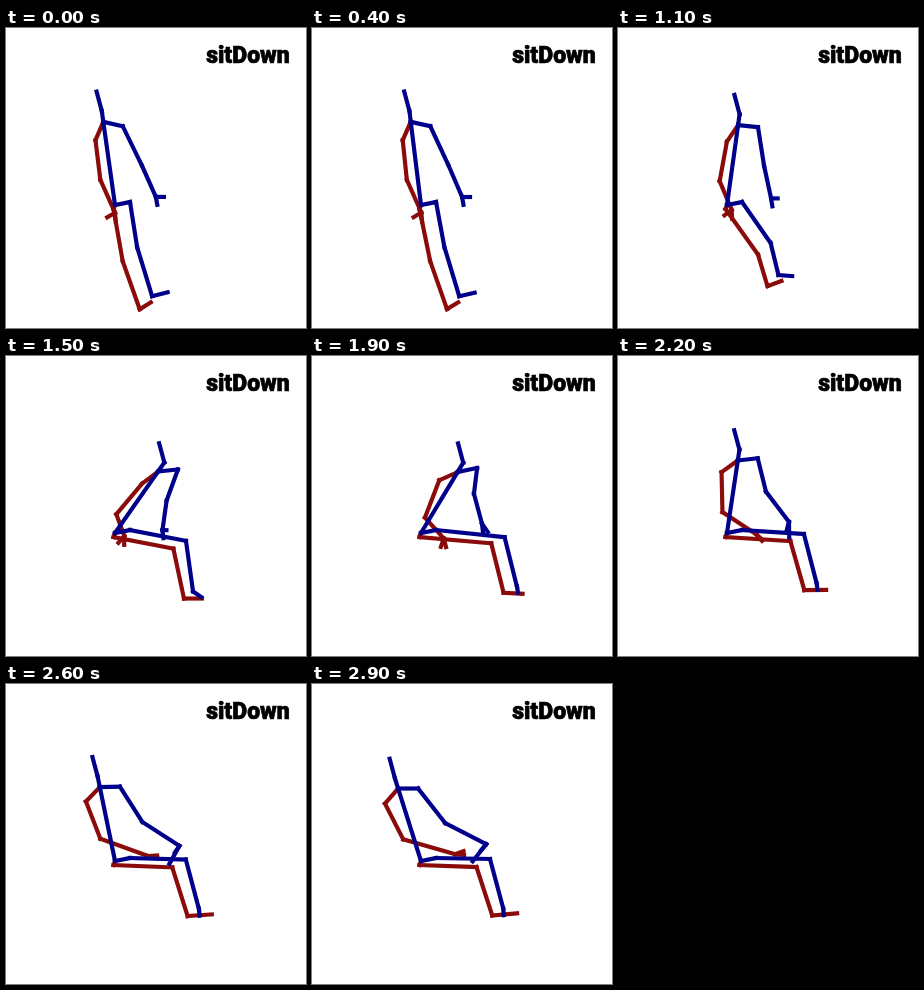
An HTML page with a canvas that plays this animation: 300 px wide and 300 px high, repeating every 3000 ms.

```html
<!DOCTYPE html>
<html lang="en">
<head>
<meta charset="utf-8">
<title>sitDown</title>
<style>
  html, body { margin: 0; width: 100%; height: 100%; overflow: hidden; background: #fff; }
  canvas { display: block; width: 300px; height: 300px; }
</style>
</head>
<body>
<canvas id="stage" width="300" height="300"></canvas>
<script>
const ctx = document.getElementById('stage').getContext('2d');
const LOOP = 3000, STEP = 100;
const PELVIS = [109, 177];

// Each bone swings through four poses: stand, lean forward, sit, recline.
// Angles are in degrees clockwise from the right; a single value stays constant.
const spine = { angle: [-98, -55, -59, -107.5], length: [84, 75, 71, 76] };
const head = { angle: -105, length: 20 };
const NECK = 11;

const blue = {
  color: '#00008b',
  hip: [124, 174],
  shoulder: { angle: [13, -6, -12, 0], length: 20 },
  upperArm: { angle: [64, 110, 97, 52], length: [43, 33, 26, 44] },
  forearm: { angle: [66, 98, 75, 27], length: [35, 30, 31, 46] },
  fingers: { angle: [0, 0, 55, 128], length: [8, 4, 10, 22] },
  thumb: { angle: [80, 83, 83, 130], length: 8 },
  thigh: { angle: [81, 11, 6, 1], length: [46, 57, 69, 54] },
  shin: { angle: [73, 82, 76, 75], length: 51 },
  foot: { angle: [-14, 35, 80, 85], length: [16, 10, 6, 7] }
};

const red = {
  color: '#8b0a0a',
  hip: [107.5, 181],
  shoulder: { angle: [113, 143, 156, 131], length: 20 },
  upperArm: { angle: [83, 130, 111, 63], length: 40 },
  forearm: { angle: [66, 70, 48, 16], length: [36, 23, 28, 54] },
  fingers: { angle: [150, 130, 108, -20], length: 9 },
  thumb: { angle: [85, 90, 75, 5], length: 9 },
  thigh: { angle: [80, 11, 5, 2], length: [53, 61, 72, 57] },
  shin: { angle: [70.5, 78, 76, 72], length: 51 },
  foot: { angle: [-32, 0, 3, -5], length: [13, 18, 19, 25] }
};

const easeOut = (u, power) => 1 - (1 - u) ** power;

// Position between the poses: 0 stand, 1 lean, 2 sit, 3 recline.
function phaseAt(t) {
  if (t < 700) return 0.04 * t / 700;
  if (t < 1100) return 0.04 + 0.33 * ((t - 700) / 400) ** 1.4;
  if (t < 1500) return 0.37 + 0.63 * easeOut((t - 1100) / 400, 1.6);
  if (t < 1900) return 1 + (t - 1500) / 400;
  return 2 + easeOut(Math.min(1, (t - 1900) / 1000), 1.75);
}

function sample(value, phase) {
  if (!Array.isArray(value)) return value;
  const i = Math.min(2, Math.floor(phase));
  return value[i] + (value[i + 1] - value[i]) * (phase - i);
}

function polar([x, y], degrees, length) {
  const a = degrees * Math.PI / 180;
  return [x + length * Math.cos(a), y + length * Math.sin(a)];
}

function reach(from, bone, phase, scale = 1) {
  return polar(from, sample(bone.angle, phase), scale * sample(bone.length, phase));
}

function drawBones(color, ...points) {
  ctx.strokeStyle = color;
  for (let i = 1; i < points.length; i++) {
    ctx.beginPath();
    ctx.moveTo(...points[i - 1]);
    ctx.lineTo(...points[i]);
    ctx.stroke();
  }
}

function drawSide(side, collar, phase) {
  // The shins point towards the viewer halfway down.
  const shorten = phase < 1 ? 1 - 0.42 * Math.sin(Math.PI * phase) ** 2 : 1;
  const knee = reach(side.hip, side.thigh, phase);
  const ankle = reach(knee, side.shin, phase, shorten);
  drawBones(side.color, PELVIS, side.hip, knee, ankle, reach(ankle, side.foot, phase));

  const shoulder = reach(collar, side.shoulder, phase);
  const elbow = reach(shoulder, side.upperArm, phase);
  const wrist = reach(elbow, side.forearm, phase);
  drawBones(side.color, collar, shoulder, elbow, wrist, reach(wrist, side.fingers, phase));
  drawBones(side.color, wrist, reach(wrist, side.thumb, phase));
}

function drawTitle() {
  ctx.fillStyle = ctx.strokeStyle = '#000';
  ctx.font = '900 23px Roboto, sans-serif';
  ctx.textAlign = 'center';
  ctx.lineWidth = 0.7;
  ctx.fillText('sitDown', 242, 35.3);
  ctx.strokeText('sitDown', 242, 35.3);
}

function draw(t) {
  ctx.fillStyle = '#fff';
  ctx.fillRect(0, 0, 300, 300);
  drawTitle();

  const phase = phaseAt(t);
  const collar = reach(PELVIS, spine, phase);
  const neck = polar(collar, sample(spine.angle, phase), NECK);
  ctx.lineWidth = 4.17;
  ctx.lineCap = 'square';
  drawSide(red, collar, phase);
  drawBones(blue.color, PELVIS, collar, neck, reach(neck, head, phase));
  drawSide(blue, collar, phase);
}

const start = performance.now();
function tick() {
  const t = (performance.now() - start) % LOOP;
  draw(Math.floor(t / STEP) * STEP);
  requestAnimationFrame(tick);
}
tick();
</script>
</body>
</html>
```
